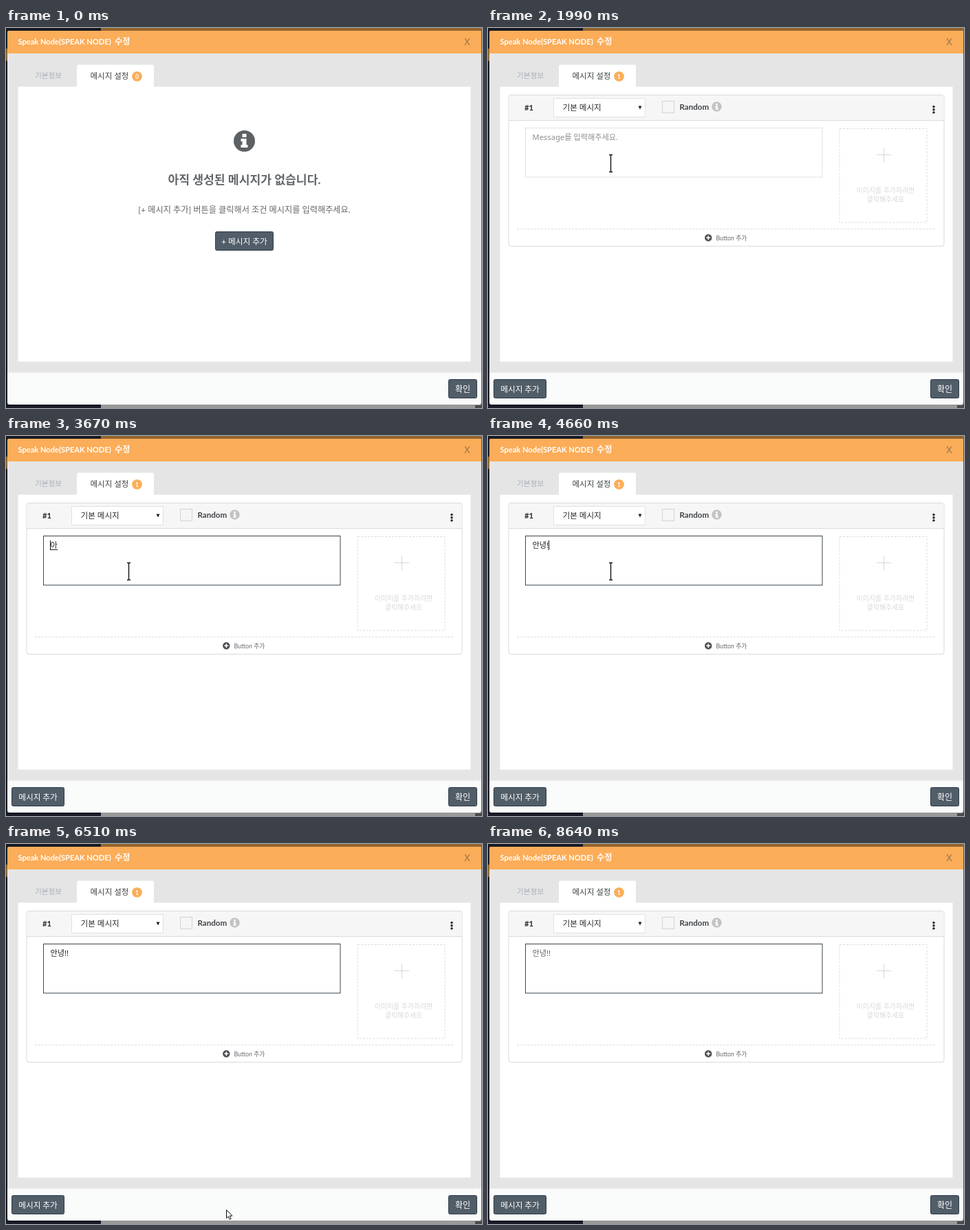
An HTML page that plays this animation: 692x553 px, repeating every 8780 ms.

```html
<!DOCTYPE html>
<html lang="ko">
<head>
<meta charset="utf-8">
<title>메시지 설정</title>
<style>
  html, body { margin: 0; width: 100%; height: 100%; overflow: hidden; background: #999; }
  svg { display: block; width: 692px; height: 553px; }
  text { font-family: Lato, "Noto Sans CJK KR", sans-serif; fill: #64676a; }
  .mid { text-anchor: middle; }
  .bold { font-weight: 700; }
  .semi { font-weight: 500; }
  .white { fill: #fff; }
  .dark { fill: #2b2b2b; }
  .btn { fill: #515d68; stroke: #2f3d4a; }
  .faint { fill: #d9d9d9; }
  .dash { fill: none; stroke: #dcdcdc; stroke-dasharray: 3 2; }
  .field, .field text { font-family: "Noto Sans", "Noto Sans CJK KR", sans-serif; font-size: 11.2px; }
  .pointer { fill: #fff; stroke: #111; stroke-linejoin: round; }
</style>
</head>
<body>
<svg viewBox="0 0 692 553">
  <!-- page behind the dialog -->
  <rect width="692" height="553" fill="#999"/>
  <rect width="692" height="48" fill="#94652f"/>
  <rect width="138" height="30" fill="#181a25"/>
  <rect y="48" width="138" height="505" fill="#181a25"/>
  <rect x="690" y="6" width="2" height="543" fill="#5b5b5f"/>
  <rect x="682" y="549" width="10" height="4" fill="#4a4b50"/>

  <!-- dialog -->
  <rect x="2" y="4" width="689" height="544" rx="3" fill="#fafbfb"/>
  <path d="M2 37V7q0-3 3-3H688q3 0 3 3V37z" fill="#fbad59"/>
  <rect x="2" y="37" width="689" height="464.5" fill="#e5e5e5"/>
  <text x="17.500" y="24" font-size="11.100" class="bold white">Speak Node(SPEAK NODE)</text>
  <text x="158" y="24.300" font-size="12.200" class="bold white">수정</text>
  <text x="670.500" y="25" font-size="13" class="mid" style="fill:#9b7548">X</text>

  <path d="M17.500 85.500H103V56q0-2.500 2.500-2.500H212.500q2.500 0 2.500 2.500V85.500H675.500V485.500H17.500z" fill="#fff"/>
  <text x="42" y="73" font-size="10.600" style="fill:#a6aebb">기본정보</text>
  <text x="122.500" y="74" font-size="11.500" class="semi" style="fill:#3c3f42">메시지 설정</text>
  <circle cx="190.500" cy="70.500" r="7.300" fill="#fbad59"/>
  <text id="count" x="190.500" y="73.600" font-size="8.500" class="mid bold white">0</text>

  <rect x="643.500" y="511.500" width="41" height="27" rx="2" class="btn"/>
  <text x="664" y="529.700" font-size="12" class="mid semi white">확인</text>

  <g id="empty">
    <circle cx="346.500" cy="164.500" r="15.500" fill="#5e6163"/>
    <path d="M343.500 154h6v5h-6zM341.500 161h8v9h2v4h-10v-4h2v-5h-2z" fill="#fff"/>
    <text x="346.500" y="226.500" font-size="17.200" class="mid bold">아직 생성된 메시지가 없습니다.</text>
    <text x="346.500" y="269" font-size="12.200" class="mid">[+ 메시지 추가] 버튼을 클릭해서 조건 메시지를 입력해주세요.</text>
    <rect id="addButton" x="304.500" y="296.500" width="84" height="27" rx="2" class="btn"/>
    <text x="346.500" y="314.500" font-size="11.700" class="mid semi white">+ 메시지 추가</text>
  </g>

  <g id="card">
    <rect x="8.500" y="511.500" width="76" height="27" rx="2" class="btn"/>
    <text x="46.500" y="529.700" font-size="11.700" class="mid semi white">메시지 추가</text>

    <rect x="30" y="97.500" width="633" height="220" rx="3" fill="#fff" stroke="#dadada"/>
    <path d="M30.500 134V100q0-2 2-2H660.500q2 0 2 2V134z" fill="#f6f6f6"/>
    <path d="M30 134.500H663" stroke="#dadada"/>
    <text x="53" y="120" font-size="11.300" class="bold dark">#1</text>
    <rect x="95.500" y="102.500" width="133" height="27" fill="#fff" stroke="#e2e2e2"/>
    <text x="108.500" y="120" font-size="11.600" class="semi dark">기본 메시지</text>
    <path d="M218.500 113.500h5l-2.500 5z" fill="#222"/>
    <rect x="253.500" y="106.500" width="17" height="17" fill="#f5f5f5" stroke="#d3d3d3"/>
    <text x="278.500" y="118.500" font-size="11.600" class="bold" style="fill:#404347">Random</text>
    <circle cx="332.500" cy="114.500" r="7.200" fill="#c3c3c3"/>
    <path d="M331.300 110h2.600v2.200h-2.600zM330.500 113.300h3.400v3.900h.900v1.600h-4.300v-1.600h.900v-2.300h-.900z" fill="#fff"/>
    <g fill="#222">
      <circle cx="648" cy="114.500" r="1.700"/><circle cx="648" cy="118.700" r="1.700"/><circle cx="648" cy="122.900" r="1.700"/>
    </g>

    <g class="field">
      <rect id="box" x="54.500" y="145.500" width="431.500" height="71.500" fill="#fff"/>
      <text id="hint" x="64.500" y="163" style="fill:#8f8f8f">Message를 입력해주세요.</text>
      <text id="typed" x="64.500" y="163"></text>
      <path id="underline" stroke="#222"/>
      <path id="caret" stroke="#111"/>
    </g>

    <rect x="511" y="146.500" width="127" height="136.500" class="dash"/>
    <path d="M565 184.500h21M575.500 174v21" stroke="#d6d6d6"/>
    <text x="578" y="239.500" font-size="9.900" class="mid faint">이미지를 추가하려면</text>
    <text x="578" y="252.500" font-size="9.800" class="mid faint">클릭해주세요</text>

    <path d="M42 292.500H651" class="dash"/>
    <circle cx="320.300" cy="305.300" r="5.200" fill="#4d5053"/>
    <path d="M317.300 305.300h6M320.300 302.300v6" stroke="#fff" stroke-width="1.600"/>
    <text x="331.500" y="309" font-size="8.800">Button 추가</text>
  </g>

  <g id="arrow" class="pointer">
    <path d="M.500.500V12.500L3.200 10l2 4.300 2-.900L5.300 9.200H8.900z"/>
  </g>
  <g id="hand" class="pointer">
    <path d="M2.500 9.500V1.800q0-1.300 1.200-1.300T5 1.800V6q2-.800 2.500.700 2-.600 2.500.800 2.300-.500 2.300 1.500v3.500q0 2-1.300 3.500v1.800H4.500V16L.300 11q-1.200-2 .700-2.300z"/>
    <path d="M5 6v3M7.500 6.700V9.500M10 7.500V10" fill="none"/>
  </g>
  <g id="beam" fill="none" stroke="#111">
    <path d="M-2.500-12.500H-1Q0-12.500 0-11.500 0-12.500 1-12.500H2.500M-2.500 12.500H-1Q0 12.500 0 11.500 0 12.500 1 12.500H2.500M0-12V12" stroke-width="1.400"/>
  </g>
</svg>
<script>
const LOOP = 8780;
const LISTED_AT = 1290;
const el = id => document.getElementById(id);
const show = (node, on) => node.setAttribute('visibility', on ? 'visible' : 'hidden');

// Each row: start time in ms, then the values held until the next row.
const pointerSteps = [
  [0, ''],
  [310, 'arrow', 480, 540], [450, 'arrow', 440, 470], [590, 'arrow', 405, 410],
  [730, 'arrow', 378, 365], [870, 'arrow', 356, 336], [1010, 'hand', 345, 315],
  [LISTED_AT, 'arrow', 347, 316], [1710, 'arrow', 300, 283], [1850, 'arrow', 225, 230],
  [1990, 'beam', 178.5, 197],
  [5800, 'arrow', 199, 259], [5940, 'arrow', 228, 322], [6080, 'arrow', 256, 385],
  [6220, 'arrow', 284, 440], [6370, 'arrow', 305, 490], [6510, 'arrow', 320, 532],
  [6650, '']
];
// Committed text, then the syllable still being composed.
const typingSteps = [
  [0, '', ''], [3530, '', 'ㅇ'], [3670, '', '아'], [3950, '', '안'],
  [4090, '안', 'ㄴ'], [4230, '안', '녀'], [4370, '안', '녕'],
  [4660, '안녕!', ''], [4800, '안녕!!', '']
];
const caretSteps = [
  [0, false], [2270, true], [2690, false], [3250, true], [5240, false], [5800, true],
  [6370, false], [6930, true], [7360, false], [7930, true], [8500, false]
];
const borderSteps = [[0, '#e0e0e0'], [2270, '#8d9599'], [2410, '#37464d']];
const inkSteps = [[0, '#222'], [8640, '#686868']];

const at = (steps, t) => steps.findLast(step => t >= step[0]).slice(1);

function drawPointer(t) {
  const [kind, x, y] = at(pointerSteps, t);
  for (const id of ['arrow', 'hand', 'beam']) show(el(id), id === kind);
  if (kind) el(kind).setAttribute('transform', `translate(${x} ${y})`);
}

function drawField(t, listed) {
  const [done, composing] = at(typingSteps, t);
  const typed = el('typed');
  const text = done + composing;
  if (typed.textContent !== text) typed.textContent = text;
  typed.style.fill = at(inkSteps, t)[0];
  el('box').setAttribute('stroke', at(borderSteps, t)[0]);
  show(el('hint'), listed && !text);

  const start = done ? typed.getSubStringLength(0, done.length) : 0;
  const x = Math.round(64 + start) + 0.5;
  el('caret').setAttribute('d', `M${x} 152V166`);
  show(el('caret'), at(caretSteps, t)[0]);
  el('underline').setAttribute('d', `M${x} 165.5h10.5`);
  show(el('underline'), composing !== '');
}

function draw(t) {
  const listed = t >= LISTED_AT;
  show(el('empty'), !listed);
  show(el('card'), listed);
  const count = listed ? '1' : '0';
  if (el('count').textContent !== count) el('count').textContent = count;
  el('addButton').style.fill = t >= 1010 ? '#90979e' : '';
  drawField(t, listed);
  drawPointer(t);
}

const begin = performance.now();
function tick() {
  draw((performance.now() - begin) % LOOP);
  requestAnimationFrame(tick);
}
tick();
</script>
</body>
</html>
```
